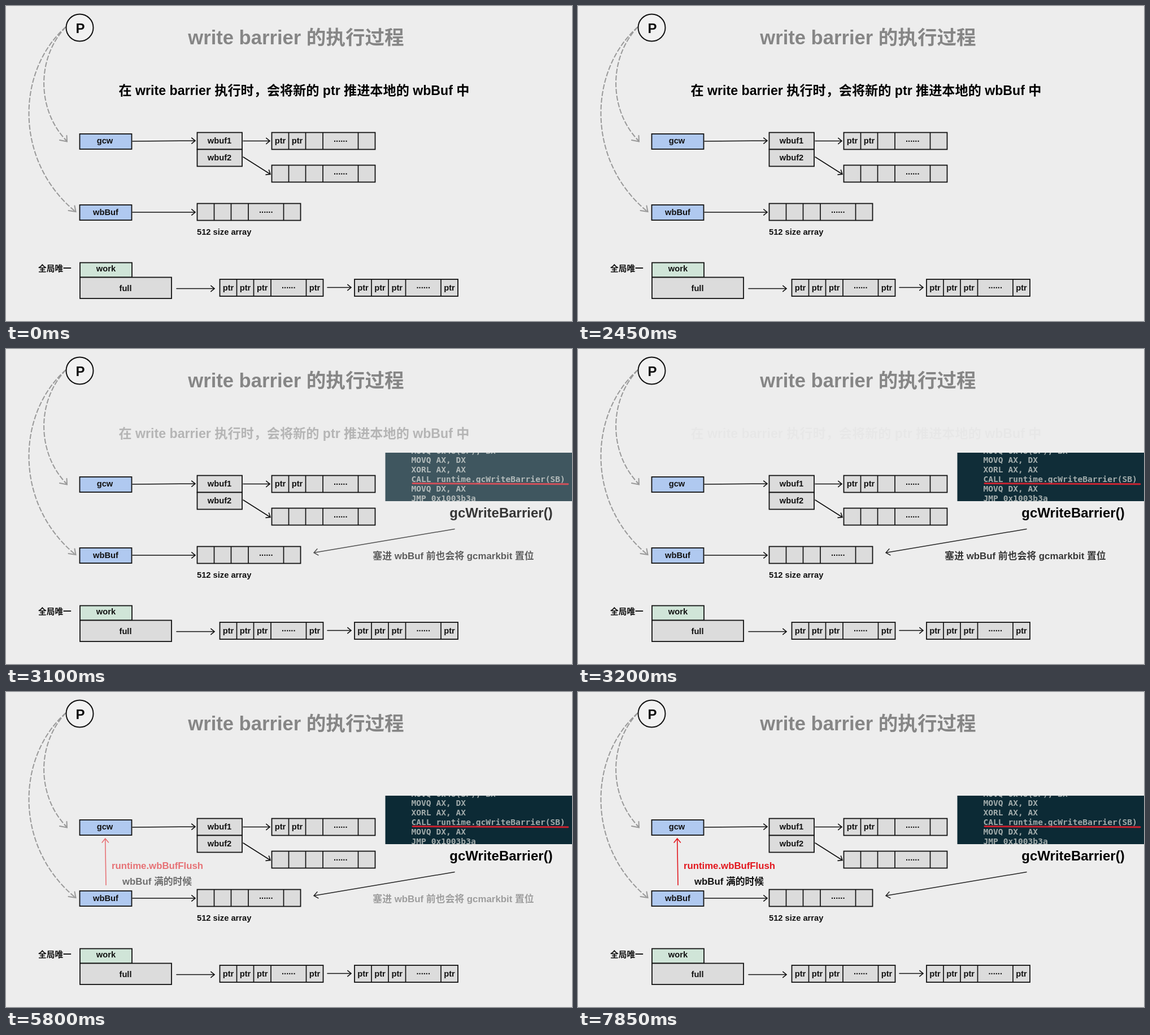
Write an HTML page that moves like this. It is 1002 px wide and 559 px high and loops after 8.07 s.

```html
<!DOCTYPE html>
<html lang="zh-CN">
<head>
<meta charset="utf-8">
<title>write barrier</title>
<style>
html, body { margin: 0; width: 100%; height: 100%; overflow: hidden; background: #ededed; }
svg { display: block; width: 1002px; height: 559px; }
text { font: bold 14.7px "Liberation Sans", "Noto Sans CJK SC", "Noto Sans CJK", sans-serif; fill: #111; white-space: pre; }
.mid { text-anchor: middle; }
.code text { font: bold 14.6px "DejaVu Sans Mono", monospace; fill: #a1abab; }
path { fill: none; }
</style>
</head>
<body>
<svg id="stage" viewBox="0 0 1002 559"></svg>
<script>
const LOOP = 8070, STEP = 50, FADE = 290;
const GREY = '#dcdcdc', BLUE = '#b0c9f0', GREEN = '#d0e5d8', RED = '#e2161d';

const text = (x, y, s, size = 14.7, fill = '#111', cls = 'mid') =>
  `<text x="${x}" y="${y}" class="${cls}" style="font-size:${size}px;fill:${fill}">${s}</text>`;
const box = (x, y, w, h, fill) =>
  `<rect x="${x}" y="${y}" width="${w}" height="${h}" fill="${fill}" stroke="#111" stroke-width="1.8"/>`;
const line = (d, color = '#111', width = 1.6, extra = '') =>
  `<path d="${d}" stroke="${color}" stroke-width="${width}" stroke-linecap="round" ${extra}/>`;

function arrow(x1, y1, x2, y2, color, width, size = 8) {
  const angle = Math.atan2(y2 - y1, x2 - x1);
  const barb = turn => `${x2 - size * Math.cos(angle + turn)} ${y2 - size * Math.sin(angle + turn)}`;
  return line(`M${x1} ${y1}L${x2} ${y2}M${barb(0.68)}L${x2} ${y2}L${barb(-0.68)}`, color, width);
}

// Five cells, the fourth a wide ellipsis; `filled` lists the cells holding a pointer.
function cells(x, y, filled = []) {
  const edges = [0, 30, 60, 90.5, 153, 183];
  const centre = i => x + (edges[i] + edges[i + 1]) / 2;
  return box(x, y, 183, 30, GREY)
    + edges.slice(1, 5).map(e => line(`M${x + e} ${y}v30`, '#111', 1.7, 'style="stroke-linecap:butt"')).join('')
    + text(centre(3), y + 16, '......')
    + filled.map(i => text(centre(i), y + 19.5, 'ptr')).join('');
}

const arc = (d, head) => line(d, '#999', 2, 'stroke-dasharray="9 3" style="stroke-linecap:butt"') + line(head, '#999', 2);

const diagram =
  text(513.5, 67.5, 'write barrier 的执行过程', 34.6, '#868686')
  + arc('M106 37C53 93 55 185 107 239', 'M95 238L108 240.5L107.5 230')
  + arc('M106 37C18 115 14 275 123 365', 'M110.5 363L123.5 365L121.5 354.5')
  + '<circle cx="130.5" cy="38.5" r="24" fill="#f1f1f1" stroke="#111" stroke-width="2"/>'
  + text(131.5, 48, 'P', 24)
  + box(130.5, 227, 92, 27, BLUE) + text(175, 244, 'gcw')
  + box(130.5, 353, 92, 27, BLUE) + text(176.5, 370.5, 'wbBuf')
  + box(338.5, 224.5, 79.5, 30, GREY) + text(378, 244, 'wbuf1')
  + box(338.5, 254.5, 79.5, 30, GREY) + text(378, 274, 'wbuf2')
  + arrow(224, 240, 335, 239) + arrow(420, 239.5, 467, 239.5)
  + arrow(420, 268, 468, 298.5) + arrow(224, 366, 335, 366)
  + cells(470.5, 224.5, [0, 1]) + cells(470.5, 282.5) + cells(338.5, 350.5)
  + text(338, 405.5, '512 size array', 14.7, '#111', '')
  + text(57, 470.5, '全局唯一', 14.7, '#111', '')
  + box(131, 455.5, 92, 26, GREEN) + text(177, 471, 'work')
  + box(131, 481.5, 162, 37.5, GREY) + text(211.5, 505.5, 'full')
  + arrow(302, 501.5, 369, 501.5) + arrow(569, 499.5, 611, 499.5)
  + cells(378.5, 485, [0, 1, 2, 4]) + cells(617, 485, [0, 1, 2, 4]);

const intro = text(510, 158, '在 write barrier 执行时，会将新的 ptr 推进本地的 wbBuf 中', 23.15, '#000');

const listing = ['MOVQ 0x48(SP), BX', 'MOVQ AX, DX', 'XORL AX, AX',
  'CALL runtime.gcWriteBarrier(SB)', 'MOVQ DX, AX', 'JMP 0x1003b3a'];
const call =
  '<clipPath id="panel"><rect x="671.5" y="184" width="331" height="86"/></clipPath>'
  + '<g class="code" clip-path="url(#panel)"><rect x="671" y="183" width="332" height="88" fill="#0c2a35"/>'
  + listing.map((s, i) => `<text x="717.5" y="${185.6 + i * 16.8}">${s}</text>`).join('') + '</g>'
  + line('M720 238.5L995 239.8', '#c9212f', 3)
  + text(876.5, 299, 'gcWriteBarrier()', 24, '#000')
  + arrow(794, 319.5, 545, 361.5, '#222', 1.5, 9);

const note = text(792, 373, '塞进 wbBuf 前也会将 gcmarkbit 置位', 16.85, '#333');

const flush = arrow(177, 342.5, 175.7, 260, RED, 1.6, 9)
  + text(268, 314, 'runtime.wbBufFlush', 16.8, RED)
  + text(267.5, 341.5, 'wbBuf 满的时候', 16.8);

const layers = { diagram, intro, call, note, flush };
const stage = document.getElementById('stage');
stage.innerHTML = Object.entries(layers).map(([id, body]) => `<g id="${id}">${body}</g>`).join('');

const show = (id, opacity) => document.getElementById(id).setAttribute('opacity', opacity);
const dissolve = (t, start) => {
  const left = 1 - Math.min(1, Math.max(0, (t - start) / FADE));
  return 1 - left * left;
};

function draw() {
  const t = Math.floor(performance.now() % LOOP / STEP) * STEP;
  const first = dissolve(t, 2950), second = dissolve(t, 5700);
  show('intro', 1 - first);
  show('call', first);
  show('note', first * (1 - second));
  show('flush', second);
  requestAnimationFrame(draw);
}
draw();
</script>
</body>
</html>
```
